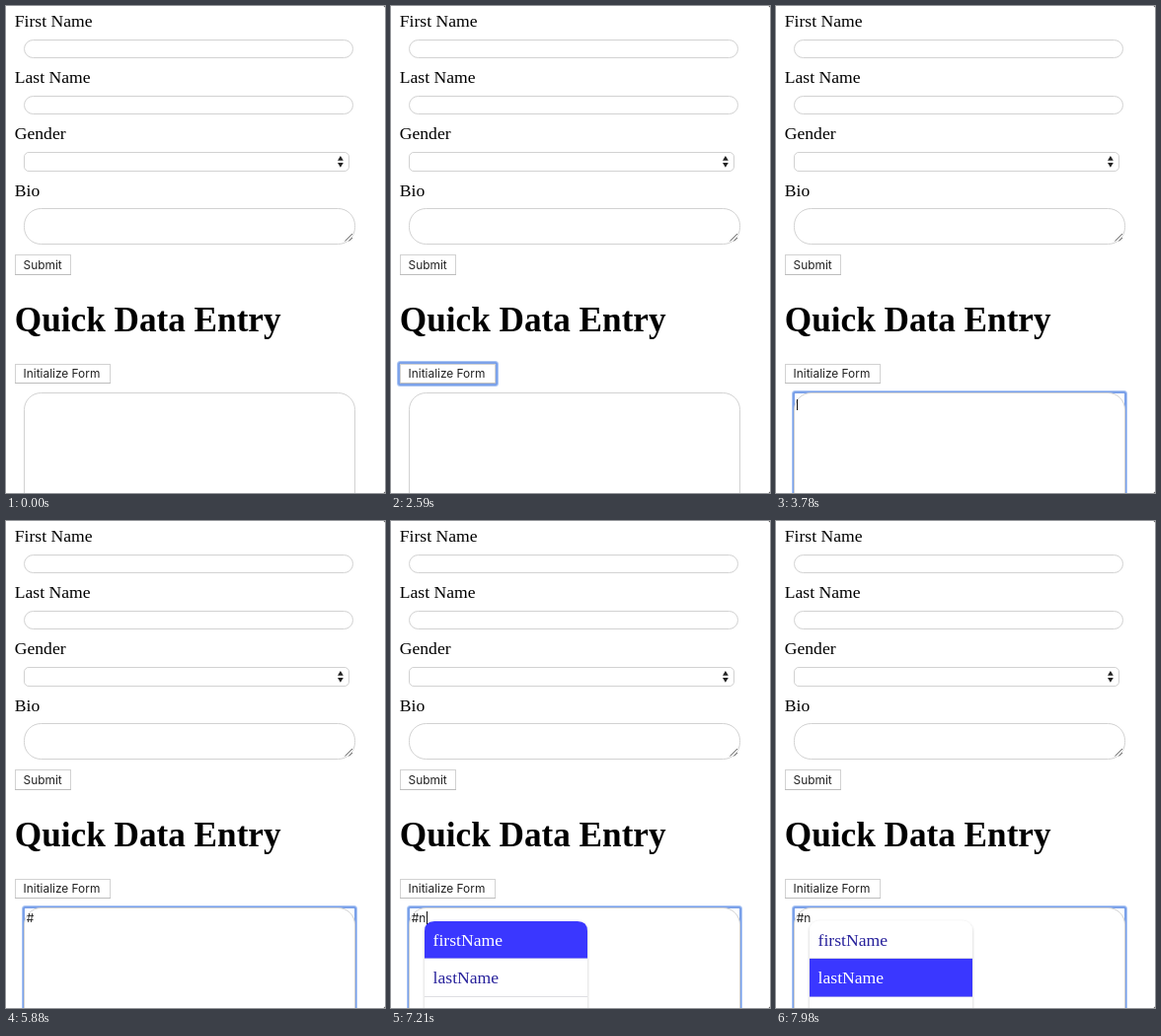
Recreate the animation shown at these times as an HTML page. Size 384 by 494 pixels, loop 8000 ms.

```html
<!DOCTYPE html>
<html lang="en">
<head>
<meta charset="utf-8">
<title>Form demo</title>
<style>
html, body { margin: 0; width: 100%; height: 100%; overflow: hidden; background: #fff; }
svg { display: block; width: 384px; height: 494px; }
text { font: 17.6px "Liberation Serif", "Times New Roman", serif; }
h1, .title { font-size: 35.2px; font-weight: 700; }
.ui { font: 11.9px Inter, "Open Sans", sans-serif; fill: #222; }
.box { fill: #fff; stroke: #d2d2d2; }
.caret { stroke: #111; }
</style>
</head>
<body>
<svg viewBox="0 0 384 494">
  <defs>
    <filter id="shadow" x="-10%" y="-10%" width="120%" height="120%">
      <feDropShadow dx="0" dy="1" stdDeviation="1.8" flood-color="#000" flood-opacity=".22"/>
    </filter>
    <filter id="soft" x="-10%" y="-20%" width="120%" height="140%">
      <feGaussianBlur stdDeviation=".5"/>
    </filter>
  </defs>
  <rect width="384" height="494" fill="#fff"/>
  <path d="M382.5 0H384V1.5ZM382.5 494H384V492.5Z" fill="#555"/>

  <text x="8.8" y="21">First Name</text>
  <text x="8.8" y="78">Last Name</text>
  <text x="8.8" y="135">Gender</text>
  <text x="8.8" y="193">Bio</text>
  <rect class="box" x="18.5" y="34.5" width="333" height="18" rx="9"/>
  <rect class="box" x="18.5" y="91.5" width="333" height="18" rx="9"/>
  <rect class="box" x="18.5" y="148.5" width="329" height="19" rx="4.5"/>
  <path d="M336 156.8L338.9 152L341.8 156.8ZM336 158.9H341.8L338.9 163.7Z" fill="#222"/>
  <rect class="box" x="18.5" y="205.5" width="335" height="36" rx="17"/>
  <path d="M343.5 238.5L351 231M347.5 238.5L351 235" stroke="#666" fill="none"/>

  <text class="title" x="8.8" y="330">Quick Data Entry</text>

  <g id="buttonRing" fill="none" filter="url(#soft)">
    <rect x="7.5" y="361.5" width="100" height="23" rx="2" stroke="#a9c4f4" stroke-width="3"/>
    <rect x="8" y="362" width="99" height="22" rx="1" stroke="#6f98e6" stroke-width="1.5"/>
  </g>
  <g class="box">
    <rect x="9.5" y="252.5" width="56" height="20"/>
    <rect x="9.5" y="363.5" width="96" height="19"/>
  </g>
  <path d="M9 272.5H66M9 382.5H106" stroke="#bdbdbd"/>
  <text class="ui" x="17.6" y="267">Submit</text>
  <text class="ui" x="17.6" y="377">Initialize Form</text>

  <g id="areaRing" fill="none" filter="url(#soft)">
    <rect x="17.5" y="391.5" width="337" height="130" rx="2" stroke="#a9c4f4" stroke-width="3"/>
    <rect x="18" y="392" width="336" height="130" rx="1" stroke="#6f98e6" stroke-width="1.6"/>
  </g>
  <rect class="box" x="18.5" y="392.5" width="335" height="130" rx="17"/>
  <text class="ui" id="typed" x="20.8" y="407"></text>
  <g id="popup">
    <rect x="34" y="405.5" width="165" height="120" rx="10" fill="#fff" filter="url(#shadow)"/>
    <path d="M34 443.5H199M34 482.5H199" stroke="#dedee2"/>
    <path id="bar0" d="M34 443.5V416Q34 406 44 406H189Q199 406 199 416V443.5Z" fill="#3a37ff"/>
    <path id="bar1" d="M34 444H199V482.5H34Z" fill="#3a37ff"/>
    <text id="item0" x="42.6" y="431">firstName</text>
    <text id="item1" x="42.6" y="469">lastName</text>
  </g>
  <path class="caret" id="caret"/>
</svg>
<script>
const LOOP = 8000;
const BUTTON = 2590, AREA = 3710, HASH = 5110, LETTER = 6230, NEXT = 7280;
// Alternating on and off times of the caret
const BLINKS = [3710, 4200, 4830, 5600, 6230, 6650, 7140, 7770];

const $ = id => document.getElementById(id);
const show = (id, on) => $(id).setAttribute("visibility", on ? "inherit" : "hidden");

function draw(t) {
  show("buttonRing", t >= BUTTON && t < AREA);
  show("areaRing", t >= AREA);
  show("popup", t >= LETTER);

  const text = t >= LETTER ? "#n" : t >= HASH ? "#" : "";
  $("typed").textContent = text;
  const x = [21.5, 29.5, 36.5][text.length];
  $("caret").setAttribute("d", text ? `M${x} 396V409` : `M${x} 399V410`);
  show("caret", BLINKS.filter(b => b <= t).length % 2 === 1);

  const picked = t >= NEXT ? 1 : 0;
  for (const i of [0, 1]) {
    show("bar" + i, t >= LETTER && i === picked);
    $("item" + i).setAttribute("fill", i === picked ? "#fff" : "#27219b");
  }
}

const start = performance.now();
function tick() {
  draw((performance.now() - start) % LOOP);
  requestAnimationFrame(tick);
}
tick();
</script>
</body>
</html>
```
